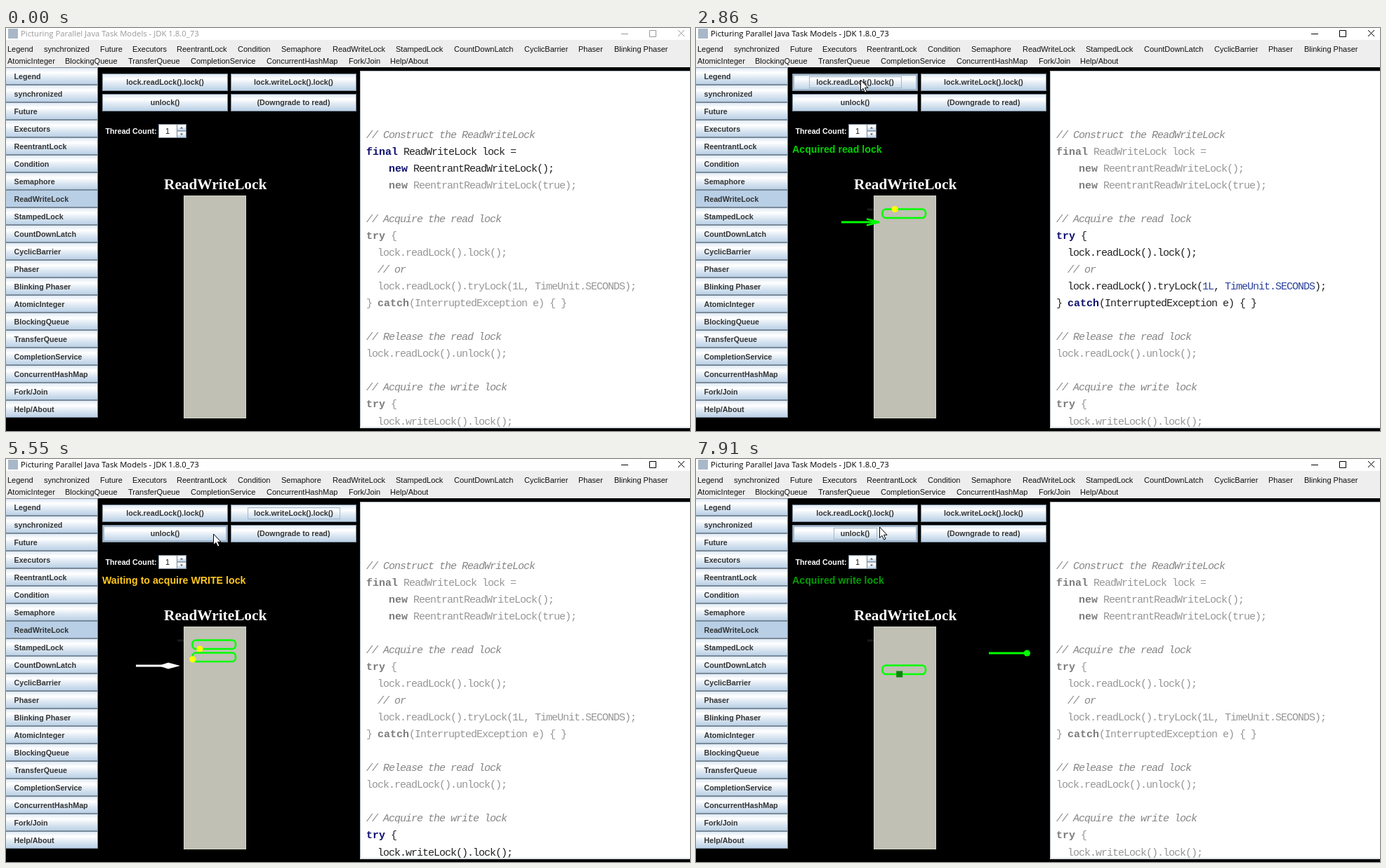
Animation, 974 px wide and 575 px high, one loop 8000 ms. Source, as an HTML page:

```html
<!DOCTYPE html>
<html lang="en">
<head>
<meta charset="utf-8">
<title>Lock demo</title>
<style>
  html, body { margin: 0; width: 100%; height: 100%; overflow: hidden; background: #000; }
  svg { display: block; }
  text { white-space: pre; }
  .caption { font: 11.3px "Open Sans", sans-serif; }
  .chrome { fill: #999; stroke: #999; }
  .chrome * { stroke-width: 1; }
  .focused .chrome { fill: #000; stroke: #000; }
  .chrome text { stroke: none; }
  .menu { font: 11px "Liberation Sans", Arial, sans-serif; fill: #111; }
  .bold { font: bold 10.7px "Liberation Sans", Arial, sans-serif; fill: #333; }
  .message { font: bold 14.2px "Liberation Sans", Arial, sans-serif; }
  .heading { font: bold 21.3px "Liberation Serif", Times, serif; fill: #fff; }
  .face { fill: url(#metal); stroke: #7a8a99; }
  .flat { fill: #b8cfe5; }
  .rim { fill: none; stroke: #a3b8cc; stroke-width: 2; }
  .ring { fill: none; stroke: #a3b8cc; }
  .code { font: 15px "Liberation Mono", "Courier New", monospace; letter-spacing: -1px; fill: #969696; }
  .code .key { font-weight: bold; letter-spacing: 0; fill: #7c7c7c; }
  .code .note { font-style: italic; fill: #858585; }
  [data-phase="construct"] .construct, [data-phase="read"] .read, [data-phase="write"] .write { fill: #222; }
  [data-phase="construct"] .construct .key, [data-phase="read"] .read .key, [data-phase="write"] .write .key { fill: #101070; }
  [data-phase="read"] .read .value { fill: #2a409c; }
</style>
</head>
<body>
<script>
const LOOP = 8000, SPEED = 0.145;
const GREEN = '#00ff00';

// Each run: first and last repaint, number of repaints
const runs = [[0, 0, 1], [130, 910, 11], [980, 980, 1], [1150, 1150, 1], [1300, 2080, 11],
  [2170, 2930, 11], [3010, 3800, 11], [3890, 4690, 11], [4760, 5550, 11],
  [5610, 6380, 11], [6460, 7230, 11], [7300, 7910, 9]];

const sideItems = ['Legend', 'synchronized', 'Future', 'Executors', 'ReentrantLock', 'Condition',
  'Semaphore', 'ReadWriteLock', 'StampedLock', 'CountDownLatch', 'CyclicBarrier', 'Phaser',
  'Blinking Phaser', 'AtomicInteger', 'BlockingQueue', 'TransferQueue', 'CompletionService',
  'ConcurrentHashMap', 'Fork/Join', 'Help/About'];
const menuX = [2, 54, 134, 180, 243, 330, 392, 465, 555, 638, 738, 815, 866,
  2, 84, 174, 263, 371, 488, 547];

const buttons = [
  { label: 'lock.readLock().lock()', x: 137, y: 65, ring: 131, presses: [[1150, 1330], [2230, 2330]] },
  { label: 'lock.writeLock().lock()', x: 320, y: 65, ring: 131, presses: [[4060, 4200]] },
  { label: 'unlock()', x: 137, y: 94, ring: 61, presses: [[5960, 6090], [7070, 7200]] },
  { label: '(Downgrade to read)', x: 320, y: 94, ring: 117, presses: [] }
];

const messages = [
  { text: 'Acquired read lock', color: '#00d200', from: 1330, to: 4240 },
  { text: 'Waiting to acquire WRITE lock', color: '#ffc81e', from: 4240, to: 6090 },
  { text: 'Acquired write lock', color: '#00d200', from: 7310, to: LOOP }
];

// "orbit" pairs a time with the distance travelled around the loop
const threads = [
  { lane: 0, start: 1364, enter: 2000, leave: 6095, orbit: [[2000, 27], [2860, 153], [4220, 352], [5550, 534], [6090, 610]] },
  { lane: 1, start: 2330, enter: 2930, leave: 7200, orbit: [[2930, 32], [4220, 221], [5550, 406], [6530, 548], [7200, 645]] },
  { lane: 2, start: 4240, enter: 7350, leave: Infinity, writer: true, grant: 7200, orbit: [[7350, 21], [7910, 102]] }
];

const pointer = [[130, 905, 560], [520, 450, 250], [910, 230, 78], [980, 234, 74], [3040, 234, 74],
  [3800, 388, 82], [4760, 388, 82], [5470, 295, 107], [5610, 295, 107], [6380, 267, 108],
  [7300, 267, 108], [7760, 261, 97]];

const codeLines = [
  ['', '// Construct the ReadWriteLock'],
  ['construct', 'final ReadWriteLock lock ='],
  ['construct', '    new ReentrantReadWriteLock();'],
  ['', '    new ReentrantReadWriteLock(true);'],
  ['', ''],
  ['', '// Acquire the read lock'],
  ['read', 'try {'],
  ['read', '  lock.readLock().lock();'],
  ['', '  // or'],
  ['read', '  lock.readLock().tryLock(1L, TimeUnit.SECONDS);'],
  ['read', '} catch(InterruptedException e) { }'],
  ['', ''],
  ['', '// Release the read lock'],
  ['', 'lock.readLock().unlock();'],
  ['', ''],
  ['', '// Acquire the write lock'],
  ['write', 'try {'],
  ['write', '  lock.writeLock().lock();']
];

const rect = (x, y, w, h, attrs) => `<rect x="${x}" y="${y}" width="${w}" height="${h}" ${attrs}/>`;
const label = (x, y, cls, text, attrs = '') => `<text x="${x}" y="${y}" class="${cls}" ${attrs}>${text}</text>`;

function codeLine([group, line], row) {
  const body = line.trimStart();
  const x = 513 + 8 * (line.length - body.length);
  const markup = body.startsWith('//')
    ? `<tspan class="note">${body}</tspan>`
    : body.replace(/\b(final|new|try|catch)\b/g, '<tspan class="key">$1</tspan>')
          .replace(/1L|TimeUnit\.SECONDS/g, '<tspan class="value">$&</tspan>');
  return label(x, 156.5 + 24.06 * row, group, markup);
}

const sideButton = (name, i) =>
  rect(-0.5, 56.5 + 25 * i, 131, 24, `class="face" ${name === 'ReadWriteLock' ? 'style="fill:#b8cfe5"' : ''}`) +
  label(11.5, 72.5 + 25 * i, 'bold', name);

const actionButton = ({ label: text, x, y, ring }) => `<g class="action">
  ${rect(x + .5, y + .5, 178, 24, 'class="face"')}
  ${rect(x + 2, y + 2, 175, 21, 'class="rim"')}
  ${rect(x + 90 - ring / 2, y + 4.5, ring, 16, 'class="ring"')}
  ${label(x + 89.5, y + 16, 'bold', text, 'text-anchor="middle"')}</g>`;

function threadMarkup({ lane, writer }) {
  const y = 258.5 + 18 * lane;
  const shape = writer
    ? '<path d="M-63 0H-12" stroke-width="3"/><path d="M-31 0L-17-4.5L0 0L-17 4.5z" stroke="none"/>'
    : '<path d="M-57 0H-4" stroke-width="3"/><path d="M-21-4.5L-3 0L-21 4.5" fill="none" stroke-width="2.4"/>';
  const bead = writer ? rect(-4.5, -4.5, 9, 9, 'fill="#0a870a"') : '<circle r="4.6" fill="#ff0"/>';
  return `<g class="thread">
    <g class="arrow">${shape}</g>
    <g class="loop"><path class="track" fill="none" stroke="${GREEN}" stroke-width="2.6"
      d="M270.5 ${y}h51.5a5 5 0 0 1 5 5v2.5a5 5 0 0 1-5 5h-51.5a5 5 0 0 1-5-5v-2.5a5 5 0 0 1 5-5z"/><g class="bead">${bead}</g></g>
    <g class="exit" fill="${GREEN}" stroke="${GREEN}"><path d="M-59 0H-5" stroke-width="3"/><circle cx="-4.6" r="4.6" stroke="none"/></g>
  </g>`;
}

document.body.innerHTML = `<svg width="974" height="575" viewBox="0 0 974 575">
  <defs><linearGradient id="metal" x2="0" y2="1">
    <stop stop-color="#dde8f3"/><stop offset=".3" stop-color="#fff"/>
    <stop offset=".6" stop-color="#dde8f3"/><stop offset="1" stop-color="#b8cfe5"/>
  </linearGradient></defs>
  ${rect(0, 0, 974, 575, 'fill="#000"')}
  ${buttons.map(actionButton).join('')}
  ${label(141.5, 151, 'bold', 'Thread Count:', 'style="fill:#fff"')}
  ${rect(217.5, 137.5, 39, 19, 'fill="#fff" stroke="#7a8a99"')}
  ${label(227, 151, 'menu', '1')}
  ${rect(243.5, 137.5, 13, 9.5, 'class="face"')}${rect(243.5, 147, 13, 9.5, 'class="face"')}
  <path d="M248 143.5l2-2.5l2 2.5zM248 150.5l2 2.5l2-2.5z" fill="#555"/>
  ${messages.map(m => label(137, 177.5, 'message', m.text, `fill="${m.color}"`)).join('')}
  ${label(225, 230, 'heading', 'ReadWriteLock')}
  ${rect(253.5, 239.5, 88, 317, 'fill="#c0c0b4" stroke="#d2d2c8"')}
  ${rect(244, 257.5, 9, 3, 'id="trace" fill="#1a1a1a"')}
  ${threads.map(threadMarkup).join('')}
  ${rect(504, 56, 470, 519, 'fill="#000"')}
  ${rect(504, 61, 470, 510, 'fill="#b4bcc4"')}
  ${rect(505, 62, 469, 508, 'fill="#fff"')}
  <g class="code">${codeLines.map(codeLine).join('')}</g>
  ${rect(504, 569, 470, 2, 'fill="#dde2e6"')}${rect(504, 571, 470, 4, 'fill="#000"')}
  ${rect(0, 56, 131, 519, 'fill="#000"')}
  ${sideItems.map(sideButton).join('')}
  ${rect(0, 0, 974, 17, 'fill="#fff"')}${rect(0, 17, 974, 39, 'fill="#eee"')}
  ${sideItems.map((name, i) => label(menuX[i], i < 13 ? 34 : 51, 'menu', name)).join('')}
  ${rect(3, 1, 14, 14, 'fill="#a9b8c8"')}
  <g class="chrome">${label(21, 12, 'caption', 'Picturing Parallel Java Task Models - JDK 1.8.0_73')}
    <path d="M876 8.5h10M916.5 3.5h9v9h-9zM957 3l9 9M966 3l-9 9" fill="none"/></g>
  <path id="cursor" d="M.5 0V15.5L4 12.3L6.6 18L9 17L6.5 11.3H11z" fill="#fff" stroke="#000"/>
</svg>`;

const svg = document.querySelector('svg');
const cursor = document.getElementById('cursor');
const trace = document.getElementById('trace');
const actionEls = [...document.querySelectorAll('.action')];
const messageEls = [...document.querySelectorAll('.message')];
const threadEls = [...document.querySelectorAll('.thread')];

const show = (el, on) => el.setAttribute('visibility', on ? 'visible' : 'hidden');
const move = (el, x, y) => el.setAttribute('transform', `translate(${x} ${y})`);

function snap(t) {
  const [first, last, count] = runs.findLast(run => run[0] <= t);
  if (count === 1) return first;
  const step = (last - first) / (count - 1);
  return Math.min(last, first + step * Math.floor((t - first) / step + .15));
}

function along(keys, t) {
  const next = keys.findIndex(key => key[0] > t);
  if (next < 0) return keys.at(-1).slice(1);
  if (next === 0) return keys[0].slice(1);
  const a = keys[next - 1], b = keys[next];
  const k = (t - a[0]) / (b[0] - a[0]);
  return a.slice(1).map((v, i) => v + (b[i + 1] - v) * k);
}

function drawThread(el, thread, t) {
  const { start, enter, leave, writer, grant } = thread;
  const y = 259 + 18 * thread.lane;
  const [arrow, loop, exit] = el.children;
  show(arrow, t >= start && t < enter);
  show(loop, t >= enter && t < leave);
  show(exit, t >= leave);

  let tip = 188 + SPEED * (t - start);
  if (writer) tip = Math.min(248, tip) + SPEED * Math.max(0, t - grant);
  const color = writer && t < grant ? '#fff' : GREEN;
  arrow.setAttribute('fill', color);
  arrow.setAttribute('stroke', color);
  move(arrow, tip, y);

  const track = loop.firstElementChild;
  const p = track.getPointAtLength(along(thread.orbit, t)[0] % track.getTotalLength());
  move(loop.lastElementChild, p.x, p.y);
  if (t >= leave) move(exit, 373 + SPEED * (t - leave), y);
}

function render(t) {
  const [px, py] = along(pointer, t);
  show(cursor, t >= 130);
  move(cursor, px, py);
  svg.classList.toggle('focused', t >= 1150);
  svg.dataset.phase = t < 1330 ? 'construct' : t < 4240 ? 'read' : t < 6090 ? 'write' : 'idle';
  show(trace, t >= 2000);

  const focus = t < 1150 ? -1 : t < 4060 ? 0 : t < 5960 ? 1 : 2;
  buttons.forEach(({ x, y, presses }, i) => {
    const [face, rim, ring] = actionEls[i].children;
    const hover = t >= 130 && px >= x && px < x + 179 && py >= y && py < y + 25;
    face.classList.toggle('flat', presses.some(([down, up]) => t >= down && t < up));
    show(rim, hover);
    show(ring, i === focus);
  });
  messages.forEach(({ from, to }, i) => {
    show(messageEls[i], t >= from && t < to);
    messageEls[i].setAttribute('opacity', Math.max(0, Math.min(1, (t - from) / 800)));
  });
  threads.forEach((thread, i) => drawThread(threadEls[i], thread, t));
}

const origin = performance.now();
function tick() {
  render(snap((performance.now() - origin) % LOOP));
  requestAnimationFrame(tick);
}
tick();
</script>
</body>
</html>
```
